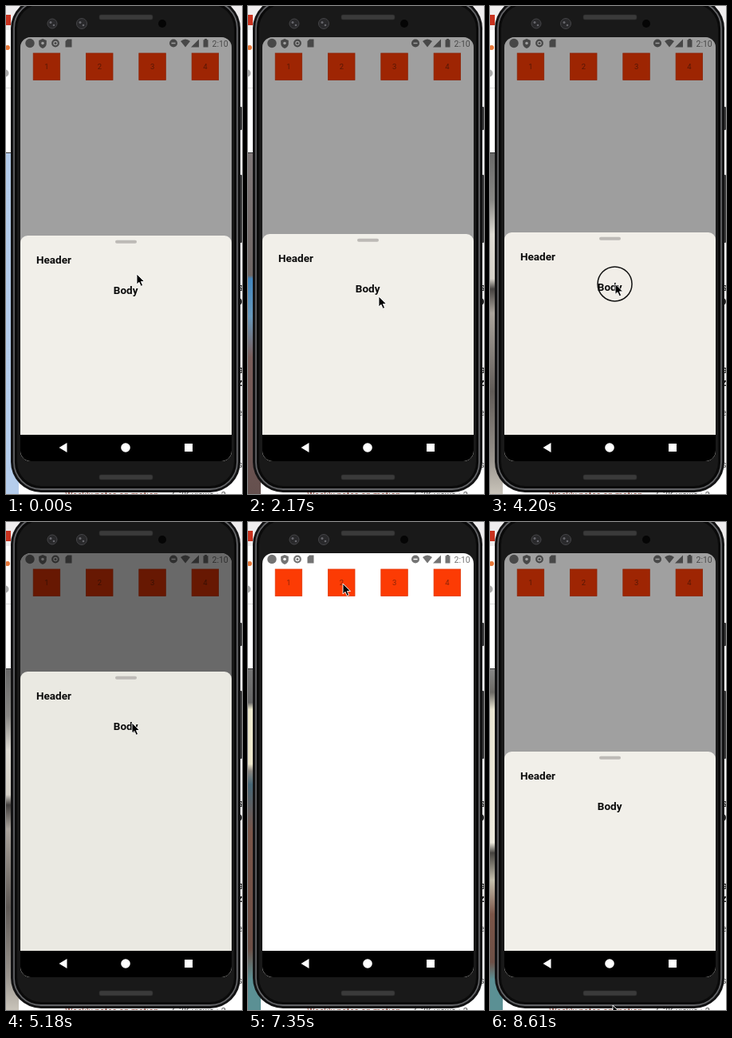
An HTML page that plays this animation: 296 by 610 pixels, repeating every 8.68 s.

```html
<!DOCTYPE html>
<html lang="en">
<head>
<meta charset="utf-8">
<title>Bottom sheet</title>
<style>
  html, body { margin: 0; width: 100%; height: 100%; overflow: hidden; background: #fff; }
  svg { display: block; font-family: Roboto, sans-serif; }
  .title { font-size: 13.5px; font-weight: 700; fill: #0a0a0a; }
  .page { font-size: 13px; font-weight: 700; fill: #222; }
  .tile { fill: #fc3b04; stroke: #e0380a; stroke-width: .8; }
  .digit { font-size: 9.5px; fill: #8c2408; text-anchor: middle; }
</style>
</head>
<body>
<svg width="296" height="610" viewBox="0 0 296 610">
  <defs>
    <clipPath id="screenClip"><rect x="18" y="39" width="265" height="530" rx="13"/></clipPath>
    <linearGradient id="video" x1="0" x2="0" y1="183" y2="610" gradientUnits="userSpaceOnUse"></linearGradient>
  </defs>

  <!-- page behind the phone -->
  <rect width="296" height="610" fill="#fff"/>
  <rect width="296" height="30" fill="#efedee"/>
  <rect x="0" y="11" width="6" height="13" fill="#c8321f"/>
  <circle cx="2" cy="52" r="3" fill="#e8793a"/>
  <circle cx="-1" cy="84" r="4.500" fill="#aaa"/>
  <path d="M0 102.500h8" stroke="#ddd"/>
  <rect y="183" width="16" height="427" fill="url(#video)"/>
  <path d="M0 183.500h8" stroke="#333"/>
  <g class="page">
    <text x="291" y="356">s</text><text x="288" y="374">D</text>
    <text x="291" y="459">a</text><text x="290" y="475">z</text>
  </g>
  <g font-size="11" fill="#555">
    <text x="291" y="512">e</text><text x="291" y="577">s</text>
    <text x="208" y="615">6.3K views • 2</text>
    <text x="74" y="615" fill="#8a4a40">Weekly notes on motion</text>
  </g>

  <!-- phone -->
  <rect x="290" y="126" width="6" height="29" rx="1" fill="#3a3a3b"/>
  <rect x="290" y="211" width="6" height="85" rx="1" fill="#3a3a3b"/>
  <rect x="6" y="-10" width="288" height="618" rx="38" fill="#121213"/>
  <rect x="10" y="-6" width="280" height="610" rx="34" fill="#0a0a0a" stroke="#626366" stroke-width="1.800"/>
  <rect x="14" y="-2" width="272" height="602" rx="30" fill="#191919"/>
  <g fill="#3a3a3a" stroke="#2a2a2a" stroke-width=".6">
    <rect x="117" y="11" width="67" height="6" rx="2"/>
    <rect x="117" y="586" width="67" height="6" rx="2"/>
  </g>
  <g fill="#29292b" stroke="#444447">
    <circle cx="58" cy="22" r="6"/><circle cx="95" cy="22" r="6.500"/>
  </g>
  <g fill="#67676c">
    <circle cx="56" cy="20.500" r="1.500"/><circle cx="60" cy="24" r="1.300"/>
    <circle cx="93" cy="20.500" r="1.500"/><circle cx="97" cy="24" r="1.300"/>
  </g>
  <circle cx="196" cy="22" r="5" fill="#050505"/>

  <g clip-path="url(#screenClip)">
    <rect x="18" y="39" width="265" height="530" fill="#fff"/>
    <g fill="#737373">
      <circle cx="30" cy="46.500" r="5.700"/>
      <path d="M46 41l4.800 2v4q0 4-4.800 6q-4.800-2-4.800-6v-4z"/>
      <circle cx="62" cy="46.500" r="3.800" fill="none" stroke="#737373" stroke-width="2.200"/>
      <circle cx="62" cy="46.500" r="1.500"/>
      <path d="M77 41.500h5.500v10h-8v-7.500z"/>
      <circle cx="210" cy="46.500" r="5"/>
      <path d="M219 44q6-5 12 0l-6 7.500z"/>
      <path d="M242 41.500v10h-10z"/>
      <path d="M249 41h3v1.200h1.500v9.300h-6v-9.300h1.500z"/>
      <text x="258.500" y="50.500" font-size="10.500">2:10</text>
    </g>
    <circle cx="46" cy="46.500" r="1.800" fill="#fff"/>
    <path d="M207.500 46.500h5" stroke="#fff" stroke-width="1.300"/>
    <g id="tiles"></g>
    <rect id="dim" x="18" y="39" width="265" height="497"/>
    <g id="sheet">
      <rect id="panel" x="18" width="265" height="520" rx="9"/>
      <rect x="137" y="5.800" width="27" height="4" rx="2" fill="#bdbab6"/>
      <text class="title" x="38" y="35">Header</text>
      <text class="title" x="150.200" y="73" text-anchor="middle">Body</text>
    </g>
    <rect x="18" y="536" width="265" height="33"/>
    <g fill="#fff">
      <path d="M66.500 552l10-6v12z"/>
      <circle cx="150" cy="552" r="5.800"/>
      <rect x="224" y="547" width="10" height="10"/>
    </g>
    <circle id="touch" r="21.500" fill="none" stroke="#111" stroke-width="1.500"/>
  </g>
  <path id="cursor" d="M0 0v13l3-2.700 2.200 5 2.400-1-2.200-4.800h4.200z" fill="#000" stroke="#fff" stroke-width=".9"/>
</svg>

<script>
const LOOP = 8680, STEP = 70;
const $ = id => document.getElementById(id);

// Easing applies to the stretch that ends at its key.
const linear = k => k;
const smooth = k => k * k * (3 - 2 * k);
const settle = k => 1 - (1 - k) ** 3;

// [time, top, easing]
const sheetKeys = [
  [0, 287], [980, 287], [1610, 384, smooth], [1680, 386, linear],
  [2170, 285, settle], [2310, 287, linear], [2660, 287],
  [3430, 351, smooth], [3920, 287, settle], [4130, 287],
  [4760, 182, smooth], [5180, 187, settle], [5530, 187],
  [5950, 337, smooth], [6300, 545, settle], [7490, 545],
  [8330, 287, settle], [LOOP, 287]
];

// [time, x, y, easing]
const cursorKeys = [
  [0, 164, 335], [840, 164, 319, smooth], [980, 164, 319],
  [1610, 164, 416, smooth], [1680, 164, 418, linear],
  [2170, 164, 363, smooth], [2590, 158, 324, smooth], [2660, 158, 324],
  [3430, 156, 388, smooth], [4060, 157, 351, smooth], [4130, 157, 351],
  [4760, 158, 246, smooth], [5180, 158, 251, smooth], [5530, 158, 251],
  [5950, 158, 400, smooth], [6300, 150, 380, smooth],
  [6930, 119, 77, smooth], [7700, 119, 77], [8610, 154, 604, smooth],
  [LOOP, 154, 604]
];

const presses = [[980, 1680], [2660, 3430], [4130, 4760], [5530, 5950], [7420, 7490]];

// Start time, then "colour position%" stops of the blurred video strip.
const scenes = [
  [0, "#b3cbea 0,#b5cdec 100"],
  [1050, "#f7f7f2 0,#f3f3ef 12,#d5d5d2 17,#f7f7f2 23,#fafaf7 100"],
  [1890, "#81797a 0,#6f6664 36,#4286be 37,#6798bb 48,#7a5d5a 60,#65504e 100"],
  [2800, "#6f6867 0,#625d5c 23,#333 24,#829bb0 28,#8295a5 48,#6b5750 63,#332c2a 74,#c58a70 79,#bd7e65 100"],
  [3900, "#686868 0,#898885 14,#dedbd3 24,#d5d1c8 37,#44413f 40,#aaa49c 47,#605b57 70,#9a958e 90,#c9c4ba 100"],
  [6000, "#777 0,#666 10,#f0ecd0 12,#eee8cd 28,#8d8882 30,#466777 34,#7a5548 48,#6c4e45 82,#5b9094 91,#5b9094 100"],
  [7900, "#888 0,#6b6964 7,#e8e4d0 12,#ece9dc 51,#44423e 54,#c5c0ad 62,#7a5548 72,#6d5046 86,#5b9094 91,#5b9094 100"]
];

function valueAt(keys, t, i = 1) {
  const n = keys.findIndex(k => k[0] > t);
  const a = keys[n - 1], b = keys[n];
  const ease = typeof b.at(-1) === "function" ? b.at(-1) : linear;
  return a[i] + (b[i] - a[i]) * ease((t - a[0]) / (b[0] - a[0]));
}

$("tiles").innerHTML = [1, 2, 3, 4].map((n, i) => {
  const x = 34 + i * 66.3;
  return `<rect class="tile" x="${x + .2}" y="59" width="33.500" height="33.500"/>
    <text class="digit" x="${x + 17}" y="79">${n}</text>`;
}).join("");

let shown;
function showScene(t) {
  const scene = scenes.findLast(s => s[0] <= t);
  if (scene === shown) return;
  shown = scene;
  $("video").innerHTML = scene[1].split(",").map(s => {
    const [color, at] = s.split(" ");
    return `<stop offset="${at}%" stop-color="${color}"/>`;
  }).join("");
}

function draw(t) {
  const top = valueAt(sheetKeys, t);
  const dim = Math.max(0, (460 - top) * .00216);
  const x = valueAt(cursorKeys, t, 1), y = valueAt(cursorKeys, t, 2);
  const shade = [252, 248, 245].map((c, i) => Math.round(c - [30, 25, 33][i] * dim));

  $("sheet").setAttribute("transform", `translate(0 ${Math.round(top)})`);
  $("panel").setAttribute("fill", `rgb(${shade})`);
  $("dim").setAttribute("opacity", dim);
  $("cursor").setAttribute("transform", `translate(${x} ${y})`);
  $("touch").setAttribute("transform", `translate(${x - .5} ${y})`);
  $("touch").setAttribute("visibility", presses.some(([a, b]) => t >= a && t < b) ? "visible" : "hidden");
  showScene(t);
}

const start = performance.now();
function tick() {
  const t = (performance.now() - start) % LOOP;
  draw(Math.floor(t / STEP) * STEP);
  requestAnimationFrame(tick);
}
tick();
</script>
</body>
</html>
```
